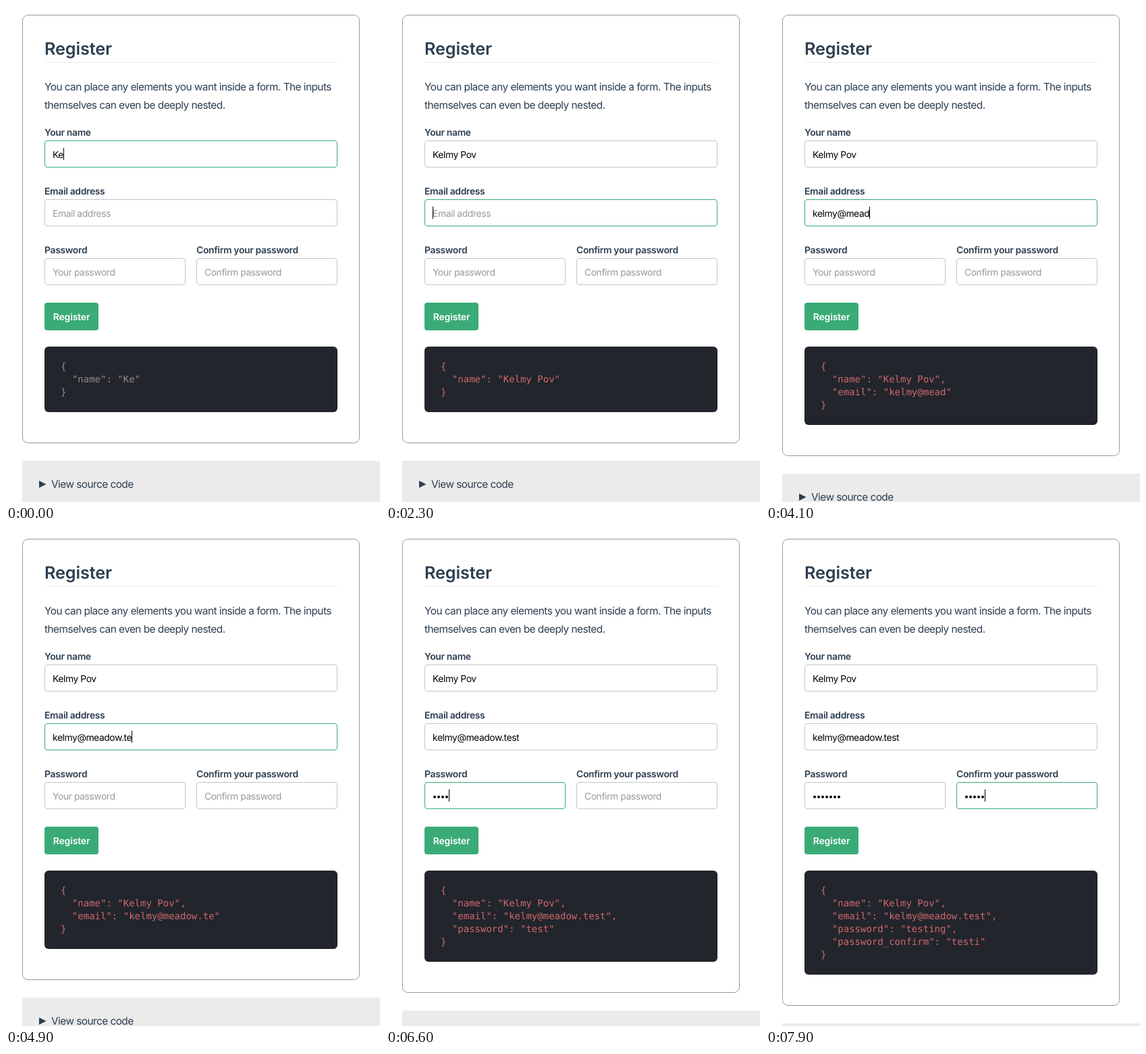
These frames come from a looping animation (554 px wide and 734 px high, 8000 ms). An HTML page:

```html
<!DOCTYPE html>
<html lang="en">
<head>
<meta charset="utf-8">
<title>Register form</title>
<style>
  html, body { margin: 0; width: 100%; height: 100%; overflow: hidden; background: #fff; }
  svg { display: block; }
  text { font-family: Inter, "Open Sans", sans-serif; fill: #2c3e50; white-space: pre; text-rendering: geometricPrecision; }
  .title { font-size: 25.2px; font-weight: 600; letter-spacing: -.1px; }
  .body { font-size: 15.4px; letter-spacing: -.55px; }
  .label { font-size: 13.9px; font-weight: 600; letter-spacing: -.33px; }
  .value { font-size: 13.9px; letter-spacing: -.43px; fill: #000; }
  .value.empty { fill: #999; }
  .button { font-size: 13.9px; font-weight: 600; letter-spacing: -.12px; fill: #fff; text-anchor: middle; }
  .box { fill: #fff; stroke: #c3c5c7; }
  .box.focus { stroke: #3aab77; }
  .dots { stroke: #000; stroke-width: 4; stroke-linecap: round; stroke-dasharray: 0 6; }
  #json text { font: 14px "DejaVu Sans Mono", monospace; fill: #d0686d; }
  #json.dim text { fill: #968a8b; }
</style>
</head>
<body>
<svg id="stage" width="554" height="734">
  <rect id="card" x="24.5" y="13.5" width="499" height="633" rx="8" fill="#fff" stroke="#979797"/>
  <text class="title" x="57" y="72">Register</text>
  <path d="M57 83.5H491" stroke="#eaecef"/>
  <text class="body" x="57" y="125">You can place any elements you want inside a form. The inputs</text>
  <text class="body" x="57" y="152">themselves can even be deeply nested.</text>
  <g id="form"></g>
  <rect id="caret" width="1" height="18"/>
  <rect x="57" y="439" width="80" height="41" rx="4" fill="#3aab77"/>
  <text class="button" x="97" y="465">Register</text>
  <rect id="panel" x="57" y="504" width="434" height="97" rx="6" fill="#22252c"/>
  <g id="json"></g>
  <g id="details">
    <rect x="24" y="673" width="530" height="100" fill="#ebebeb"/>
    <path d="M49 702.5L59.5 707.8L49 713Z" fill="#2c3e50"/>
    <text class="body" x="67" y="713">View source code</text>
  </g>
</svg>
<script>
const LOOP = 8000, STEP = 100, LINE = 19;
const $ = id => document.getElementById(id);

function add(parent, tag, attrs, text = '') {
  const el = document.createElementNS('http://www.w3.org/2000/svg', tag);
  for (const k in attrs) el.setAttribute(k, attrs[k]);
  el.textContent = text;
  return parent.appendChild(el);
}

const every = (n, start, gap) => Array.from({ length: n }, (_, i) => start + i * gap);

// focus: when the field gains focus; keys: when each character arrives
const fields = [
  { key: 'name', label: 'Your name', hint: '', text: 'Kelmy Pov', x: 57, y: 199, w: 434,
    focus: 0, keys: [0, 0, 200, 400, 600, 800, 1200, 1400, 1600] },
  { key: 'email', label: 'Email address', hint: 'Email address', text: 'kelmy@meadow.test', x: 57, y: 286, w: 434,
    focus: 2100, keys: [...every(5, 2450, 150), ...every(12, 3230, 180)] },
  { key: 'password', label: 'Password', hint: 'Your password', text: 'testing', x: 57, y: 373, w: 209,
    focus: 6000, keys: every(7, 6140, 150), secret: true },
  { key: 'password_confirm', label: 'Confirm your password', hint: 'Confirm password', text: 'testi', x: 282, y: 373, w: 209,
    focus: 7200, keys: every(5, 7380, 125), secret: true }
];

for (const f of fields) {
  const form = $('form');
  add(form, 'text', { class: 'label', x: f.x, y: f.y - 7 }, f.label);
  f.box = add(form, 'rect', { x: f.x + .5, y: f.y + .5, width: f.w - 1, height: 39, rx: 3.5 });
  f.value = add(form, 'text', { x: f.x + 12, y: f.y + 26 });
  f.dots = add(form, 'path', { class: 'dots' });
}
const rows = every(6, 538, LINE).map(y => add($('json'), 'text', { y }));

function draw(t) {
  const active = fields.filter(f => f.focus <= t).pop();
  for (const f of fields) {
    const n = f.n = f.keys.filter(k => k <= t).length;
    f.typed = f.text.slice(0, n);
    f.box.setAttribute('class', f === active ? 'box focus' : 'box');
    f.value.setAttribute('class', n ? 'value' : 'value empty');
    f.value.textContent = !n ? f.hint : f.secret ? '' : f.typed;
    f.dots.setAttribute('d', f.secret && n ? `M${f.x + 15} ${f.y + 22}h${(n - 1) * 6 + .01}` : '');
  }

  const { x, y, n, secret, value, focus, keys } = active;
  const width = !n ? 0 : secret ? n * 6 : value.getComputedTextLength();
  const last = n ? keys[n - 1] : focus;
  const caret = $('caret');
  caret.setAttribute('x', Math.round(x + 12 + width));
  caret.setAttribute('y', y + 11);
  caret.setAttribute('opacity', (t - last) % 1000 < 500 ? 1 : 0);

  const filled = fields.filter(f => f.n);
  const lines = ['{', ...filled.map((f, i) =>
    `"${f.key}": "${f.typed}"${i < filled.length - 1 ? ',' : ''}`), '}'];
  rows.forEach((row, i) => {
    const line = lines[i] || '';
    row.textContent = line;
    row.setAttribute('x', line[0] === '"' ? 97.86 : 81);
  });
  $('json').setAttribute('class', t < 200 ? 'dim' : '');

  const grow = (filled.length - 1) * LINE;
  $('panel').setAttribute('height', 97 + grow);
  $('card').setAttribute('height', 633 + grow);
  $('details').setAttribute('transform', `translate(0 ${grow})`);
}

let shown = -1;
function tick() {
  const t = Math.floor(performance.now() % LOOP / STEP) * STEP;
  if (t !== shown) draw(shown = t);
  requestAnimationFrame(tick);
}
tick();
</script>
</body>
</html>
```
